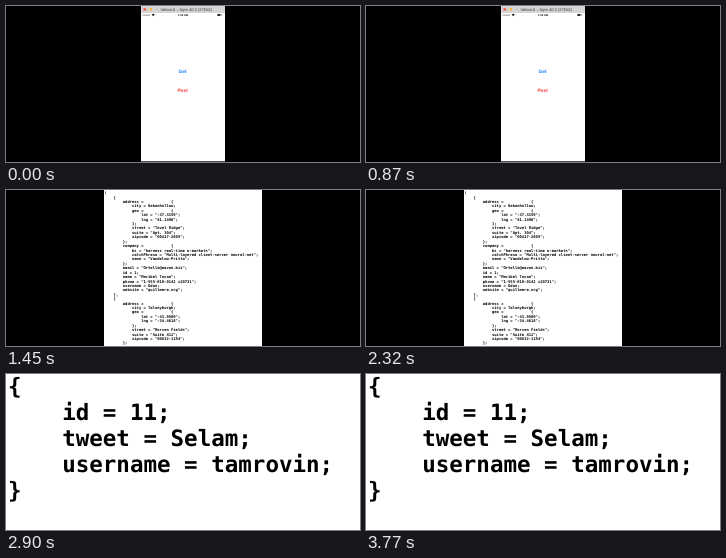
An HTML page for the animation above (4.35 s loop, 354 by 156 pixels).

```html
<!DOCTYPE html>
<html lang="en">
<head>
<meta charset="utf-8">
<title>Requests</title>
<style>
  html, body { margin: 0; width: 100%; height: 100%; overflow: hidden; background: #000; }
  svg { display: block; width: 100%; height: 100%; }
  text { white-space: pre; text-rendering: geometricPrecision; }
  .ui { font-family: "Liberation Sans", Arial, sans-serif; text-anchor: middle; }
  .mono { font-family: "DejaVu Sans Mono", monospace; font-weight: bold; }
  .scene { visibility: hidden; animation: show 4350ms step-end infinite; }
  #list { animation-delay: -2900ms; }
  #reply { animation-delay: -1450ms; }
  @keyframes show {
    0% { visibility: visible; }
    33.3333%, 100% { visibility: hidden; }
  }
</style>
</head>
<body>
<svg viewBox="0 0 354 156" preserveAspectRatio="none">
  <g id="app" class="scene">
    <rect x="135" width="84" height="155.3" fill="#fff"/>
    <rect x="135" width="84" height="6.5" fill="#d5d5d5"/>
    <rect x="135" y="6.2" width="84" height=".4" fill="#b4b4b4"/>
    <circle cx="138.8" cy="3.2" r="1.5" fill="#f3655b"/>
    <circle cx="144.8" cy="3.2" r="1.5" fill="#f6bd45"/>
    <circle cx="150.8" cy="3.2" r="1.5" fill="#c9c9c9"/>
    <g class="ui">
      <text x="180.5" y="4.7" font-size="4" fill="#333" textLength="">Velora 6 – Nym 40.3 (27D41)</text>
      <text x="140.4" y="10" font-size="2.6" fill="#222">Carrier</text>
      <text x="177" y="10" font-size="2.7" font-weight="bold" fill="#111">1:08 AM</text>
      <text x="176.5" y="66.6" font-size="4.8" font-weight="bold" fill="#1583f2">Get</text>
      <text x="176.6" y="85.6" font-size="4.8" font-weight="bold" fill="#f23a30">Post</text>
    </g>
    <path d="M145.6 8.4q1.6-1.2 3.2 0l-1.6 1.8z" fill="#222"/>
    <rect x="211.4" y="8" width="3" height="1.9" rx=".4" fill="#222"/>
    <rect x="214.8" y="8.2" width="1.6" height="1.5" rx=".3" fill="#aaa"/>
  </g>

  <g id="list" class="scene">
    <rect x="98" width="158" height="156" fill="#fff"/>
    <g id="lines" class="mono" font-size="3.82"></g>
  </g>

  <g id="reply" class="scene">
    <rect width="354" height="156" fill="#fff"/>
    <g id="big" class="mono" font-size="22.5"></g>
  </g>
</svg>
<script>
  const users = `(
    {
        address =            {
            city = Oakenhollow;
            geo =            {
                lat = "-37.3159";
                lng = "81.1496";
            };
            street = "Tovel Ridge";
            suite = "Apt. 304";
            zipcode = "00417-2605";
        };
        company =            {
            bs = "harness real-time e-markets";
            catchPhrase = "Multi-layered client-server neural-net";
            name = "Vandelmo-Pritta";
        };
        email = "Ortelle@mavon.biz";
        id = 1;
        name = "Maribel Tovan";
        phone = "1-555-010-0142 x20731";
        username = Odun;
        website = "quillmere.org";
    },
    {
        address =            {
            city = Talonyburgh;
            geo =            {
                lat = "-43.9509";
                lng = "-34.4618";
            };
            street = "Morven Fields";
            suite = "Suite 412";
            zipcode = "00832-1194";
        };`;

  const reply = `{
    id = 11;
    tweet = Selam;
    username = tamrovin;
}`;

  function print(id, source, x, y, pitch, advance) {
    const box = document.getElementById(id);
    source.split("\n").forEach((line, i) => {
      const text = document.createElementNS(box.namespaceURI, "text");
      text.setAttribute("x", x + line.search(/\S/) * advance);
      text.setAttribute("y", y + i * pitch);
      text.textContent = line.trim();
      box.append(text);
    });
  }

  print("lines", users, 98.4, 4.1, 4.42, 2.3);
  print("big", reply, 2, 19.8, 26, 13.55);
</script>
</body>
</html>
```
